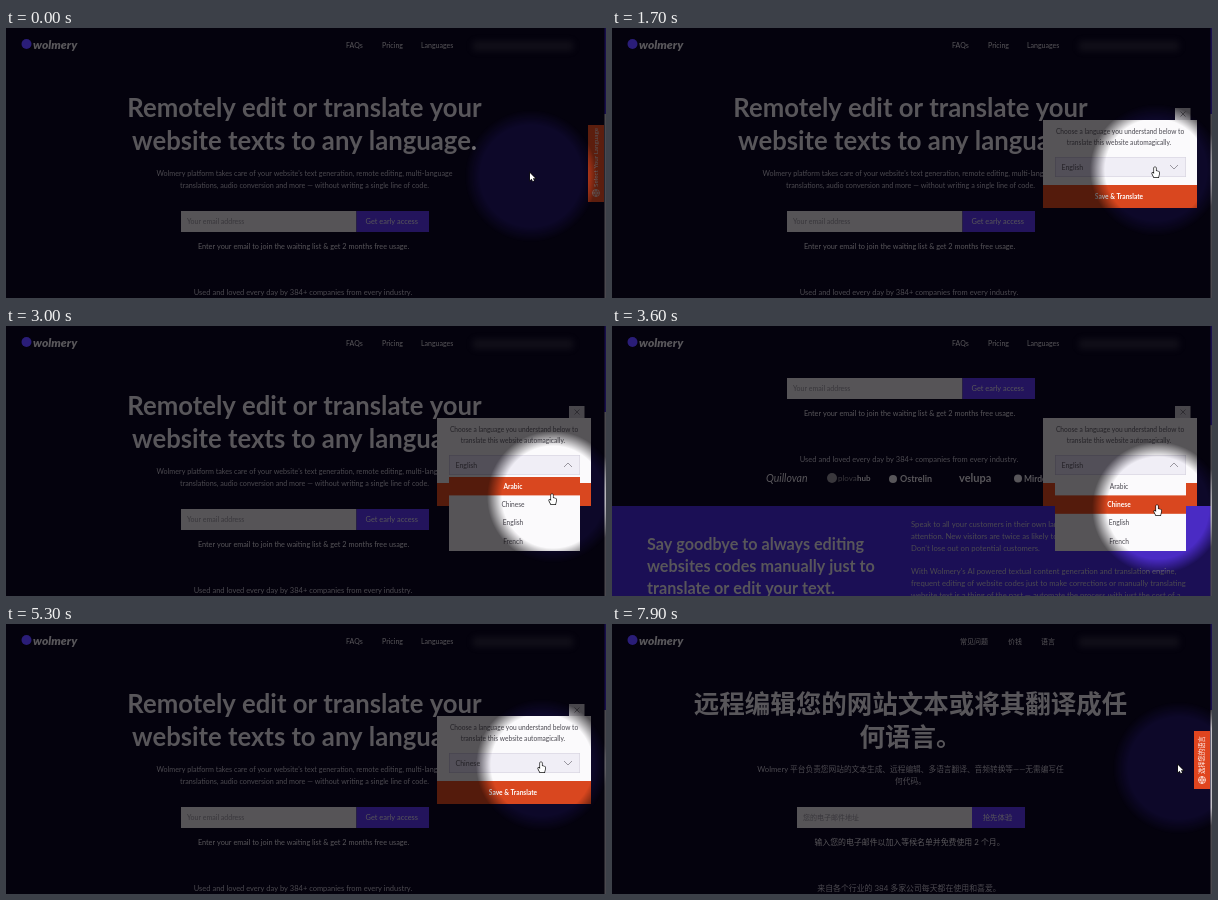
Recreate the animation shown at these times as an HTML page with a canvas. Size 600 by 270 pixels, loop 8000 ms.

```html
<!DOCTYPE html>
<html lang="zh-CN">
<head>
<meta charset="utf-8">
<title>Language picker</title>
<style>
  html, body { margin: 0; width: 100%; height: 100%; overflow: hidden; background: #04020d; }
  canvas { display: block; width: 600px; height: 270px; }
</style>
</head>
<body>
<canvas id="stage" width="600" height="270"></canvas>
<script>
const W = 600, H = 270, LOOP = 8000, STEP = 100;
const stage = document.getElementById('stage').getContext('2d');
const spotCanvas = Object.assign(document.createElement('canvas'), { width: W, height: H });
const spot = spotCanvas.getContext('2d');
const FAMILY = 'Lato, "Noto Sans CJK SC", "Noto Sans CJK", sans-serif';

const LIT = {
  bg: '#0d0829', ink: '#ffffff', soft: '#d6d4dc', panel: '#fbfafc', field: '#f0eef6', line: '#d5d2de',
  dark: '#4a4850', hint: '#8f8c96', orange: '#d9471f', tab: '#e0451f', violet: '#4726b4',
  section: '#4a2bc4', mark: '#5a42d8', close: '#cfcdd3', track: '#3a22a0', thumb: '#c4c2c8'
};
const DIM = {
  bg: '#04020d', ink: '#58565a', soft: '#4c4a50', panel: '#565457', field: '#524f58', line: '#45424c',
  dark: '#242227', hint: '#39373c', orange: '#541b0c', tab: '#5c1e0e', violet: '#23145c',
  section: '#1b0f55', mark: '#2a1d78', close: '#48464b', track: '#170d4c', thumb: '#4a484e'
};

const EN = {
  nav: [['FAQs', 340], ['Pricing', 376], ['Languages', 415]],
  title: ['Remotely edit or translate your', 'website texts to any language.'], titleSize: 25.7,
  lead: ["Wolmery platform takes care of your website's text generation, remote editing, multi-language",
    'translations, audio conversion and more — without writing a single line of code.'], leadSize: 7.2,
  form: [175, 350.5, 423], button: 'Get early access', hint: 'Your email address',
  note: 'Enter your email to join the waiting list & get 2 months free usage.', noteSize: 7.3,
  used: 'Used and loved every day by 384+ companies from every industry.', usedSize: 7.5,
  tab: 'Select Your Language', tabBox: [97, 77]
};
const ZH = {
  nav: [['常见问题', 348], ['价钱', 396], ['语言', 429]],
  title: ['远程编辑您的网站文本或将其翻译成任', '何语言。'], titleSize: 25.5,
  lead: ['Wolmery 平台负责您网站的文本生成、远程编辑、多语言翻译、音频转换等——无需编写任', '何代码。'], leadSize: 7.7,
  form: [185, 360, 413], button: '抢先体验', hint: '您的电子邮件地址',
  note: '输入您的电子邮件以加入等候名单并免费使用 2 个月。', noteSize: 7.9,
  used: '来自各个行业的 384 多家公司每天都在使用和喜爱。', usedSize: 7.9,
  tab: '选择您的语言', tabBox: [107, 58]
};
const OPTIONS = ['Arabic', 'Chinese', 'English', 'French'], ROW = 18.4, LIST_TOP = 151;

// time, x, y of the pointer tip
const POINTER = [
  [100, 524, 145], [900, 590, 140], [1200, 590, 140], [1700, 543, 139], [2100, 548, 142],
  [2200, 548, 142], [3000, 546, 168], [3600, 545, 179], [3700, 545, 179], [4200, 559, 148],
  [4600, 537, 168], [4700, 537, 171], [4900, 537, 171], [5300, 535, 138], [5800, 515, 172],
  [6900, 515, 172], [7000, 522, 162], [7700, 522, 162], [7900, 566, 141]
];
const SCROLL = [[3000, 0], [3600, 131], [3700, 131], [4200, 0]];

function track(keys, t) {
  const i = keys.findIndex(key => key[0] > t);
  if (i < 0) return keys[keys.length - 1].slice(1);
  if (i === 0) return keys[0].slice(1);
  const a = keys[i - 1], b = keys[i];
  const u = (t - a[0]) / (b[0] - a[0]), eased = u * u * (3 - 2 * u);
  return a.slice(1).map((v, k) => v + (b[k + 1] - v) * eased);
}
const between = (t, from, to) => t >= from && t < to;

function stateAt(t) {
  const [x, y] = track(POINTER, t);
  const panel = between(t, 1100, 6300), open = between(t, 2200, 5000);
  return {
    x, y, panel, open,
    scroll: track(SCROLL, t)[0],
    hand: between(t, 700, 4000) || between(t, 4500, 6700),
    hovered: Math.max(0, Math.min(3, Math.floor((y - LIST_TOP) / ROW))),
    onSave: panel && !open && between(y, 157, 180),
    chosen: t < 5000 ? 'English' : 'Chinese',
    copy: t < 6300 ? EN : ZH
  };
}

// y is the middle of the capitals
function text(g, str, x, y, size, color, align = 'left', style = '') {
  g.font = `${style} ${size}px ${FAMILY}`;
  g.fillStyle = color;
  g.textAlign = align;
  g.fillText(str, x, y + size * 0.36);
}
function box(g, x, y, w, h, color) {
  g.fillStyle = color;
  g.fillRect(x, y, w, h);
}
function disc(g, x, y, r, color) {
  g.fillStyle = color;
  g.beginPath();
  g.arc(x, y, r, 0, 7);
  g.fill();
}
function stroke(g, path, color, width = 0.8) {
  g.strokeStyle = color;
  g.lineWidth = width;
  g.stroke(new Path2D(path));
}

function drawPage(g, c, copy) {
  copy.title.forEach((line, i) =>
    text(g, line, 298.5, 79.5 + i * 33.5, copy.titleSize, c.ink, 'center', 'bold'));
  copy.lead.forEach((line, i) =>
    text(g, line, 298.5, 145.5 + i * 12, copy.leadSize, c.soft, 'center'));

  const [left, split, right] = copy.form;
  box(g, left, 183, split - left, 21, c.panel);
  box(g, split, 183, right - split, 21, c.violet);
  text(g, copy.hint, left + 6, 193.5, 7, c.hint);
  text(g, copy.button, (split + right) / 2 - 1, 193.5, 7.4, c.ink, 'center');
  text(g, copy.note, 297.5, 218, copy.noteSize, c.ink, 'center');
  text(g, copy.used, 297, 264.5, copy.usedSize, c.soft, 'center');

  text(g, 'Quillovan', 154, 283, 10.5, c.ink, 'left', 'italic');
  disc(g, 220, 283, 5, c.hint);
  text(g, 'plova', 226, 283, 8, c.hint);
  text(g, 'hub', 245, 283, 8, c.ink, 'left', 'bold');
  disc(g, 281, 284, 4, c.ink);
  text(g, 'Ostrelin', 288, 283.5, 9, c.ink, 'left', 'bold');
  text(g, 'velupa', 347, 283.5, 11, c.ink, 'left', 'bold');
  disc(g, 406, 283.5, 4, c.ink);
  text(g, 'Mirdolex', 412, 283.5, 8.5, c.ink, 'left', 'bold');

  box(g, 0, 311, W, 200, c.section);
  ['Say goodbye to always editing', 'websites codes manually just to', 'translate or edit your text.']
    .forEach((line, i) => text(g, line, 35, 349 + i * 22, 16.2, c.ink, 'left', 'bold'));
  [['Speak to all your customers in their own language and get their', 329],
   ['attention. New visitors are twice as likely to become customers.', 341],
   ["Don't lose out on potential customers.", 353],
   ["With Wolmery's AI powered textual content generation and translation engine,", 376],
   ['frequent editing of website codes just to make corrections or manually translating', 388],
   ['website text is a thing of the past — automate the process with just the cost of a', 400]]
    .forEach(([line, y]) => text(g, line, 299, y, 7.7, c.soft));
}

function drawHeader(g, c, copy) {
  box(g, 0, 0, W, 36, c.bg);
  disc(g, 20.5, 16, 5, c.mark);
  text(g, 'wolmery', 27, 17, 12, c.ink, 'left', 'italic 900');
  copy.nav.forEach(([label, x]) => text(g, label, x, 17.5, 7, c.ink));
  g.save();
  g.filter = 'blur(3px)';
  g.globalAlpha = 0.16;
  box(g, 467, 13, 100, 10, c.ink);
  g.restore();
}

function drawTab(g, c, copy) {
  const [top, height] = copy.tabBox, globeY = top + height - 9;
  box(g, 582, top, 16, height, c.tab);
  g.save();
  g.translate(590, globeY - 6);
  g.rotate(-Math.PI / 2);
  text(g, copy.tab, 0, 0, 6.3, c.ink);
  g.restore();
  g.save();
  g.translate(590, globeY);
  stroke(g, 'M-3.5 0A3.5 3.5 0 1 1 3.5 0A3.5 3.5 0 1 1 -3.5 0H3.5M0 -3.5Q-3 0 0 3.5Q3 0 0 -3.5', c.ink, 0.7);
  g.restore();
}

function drawPanel(g, c, s) {
  box(g, 563, 80, 15.5, 12, c.close);
  stroke(g, 'M568.5 83.5l5 5m0 -5l-5 5', c.dark, 0.7);
  box(g, 431, 92, 154, 66, c.panel);
  text(g, 'Choose a language you understand below to', 508, 104, 6.6, c.dark, 'center');
  text(g, 'translate this website automagically.', 507, 115, 6.6, c.dark, 'center');
  box(g, 443, 129, 131, 20, c.line);
  box(g, 443.6, 129.6, 129.8, 18.8, c.field);
  text(g, s.chosen, 449.5, 139, 7, c.dark);
  stroke(g, s.open ? 'M558 141l4 -4l4 4' : 'M558 137l4 4l4 -4', c.hint, 0.9);
  box(g, 431, 157, 154, 23, s.onSave ? c.violet : c.orange);
  text(g, 'Save & Translate', 507, 168.5, 6.6, c.ink, 'center', 'bold');
  if (!s.open) return;

  box(g, 443, LIST_TOP, 131, 74, c.panel);
  OPTIONS.forEach((name, i) => {
    const active = i === s.hovered, y = LIST_TOP + i * ROW;
    if (active) box(g, 443, y, 131, ROW, c.orange);
    text(g, name, 507, y + 9.3, 6.6, active ? c.ink : c.dark, 'center', active ? 'bold' : '');
  });
}

function drawScene(g, c, s) {
  box(g, 0, 0, W, H, c.bg);
  g.save();
  g.translate(0, -s.scroll);
  drawPage(g, c, s.copy);
  g.restore();
  drawHeader(g, c, s.copy);
  const thumbTop = 86 + s.scroll * 0.1;
  box(g, 598.5, 0, 1.5, thumbTop, c.track);
  box(g, 598.5, thumbTop, 1.5, H - thumbTop, c.thumb);
  if (s.panel) drawPanel(g, c, s);
  else drawTab(g, c, s.copy);
}

function drawSpotlight(s) {
  const x = s.x + 1, y = s.y + 3;
  drawScene(spot, LIT, s);
  const glow = spot.createRadialGradient(x, y, 51, x, y, 66);
  glow.addColorStop(0, '#000');
  glow.addColorStop(1, 'rgba(0,0,0,0)');
  spot.globalCompositeOperation = 'destination-in';
  box(spot, 0, 0, W, H, glow);
  spot.globalCompositeOperation = 'source-over';
  stage.drawImage(spotCanvas, 0, 0);
}

const ARROW = 'M0 0V7.2L1.7 5.7L2.8 8.2L4 7.7L2.9 5.2H5.2Z';
const HAND = 'M-.9 .8Q0 -.6 .9 .8V4L3.6 4.6Q4.4 5 4.2 6.2L3.4 10.2H-1L-2.8 6.8Q-3 5.6 -2 5.8L-.9 7Z';

function drawPointer(s) {
  stage.save();
  stage.translate(s.x, s.y);
  const path = s.hand ? HAND : ARROW;
  stroke(stage, path, '#111', 1.4);
  stage.fillStyle = '#fff';
  stage.fill(new Path2D(path));
  stage.restore();
}

function frame() {
  const t = Math.floor(performance.now() % LOOP / STEP) * STEP;
  const s = stateAt(t);
  drawScene(stage, DIM, s);
  drawSpotlight(s);
  drawPointer(s);
  requestAnimationFrame(frame);
}
frame();
</script>
</body>
</html>
```
